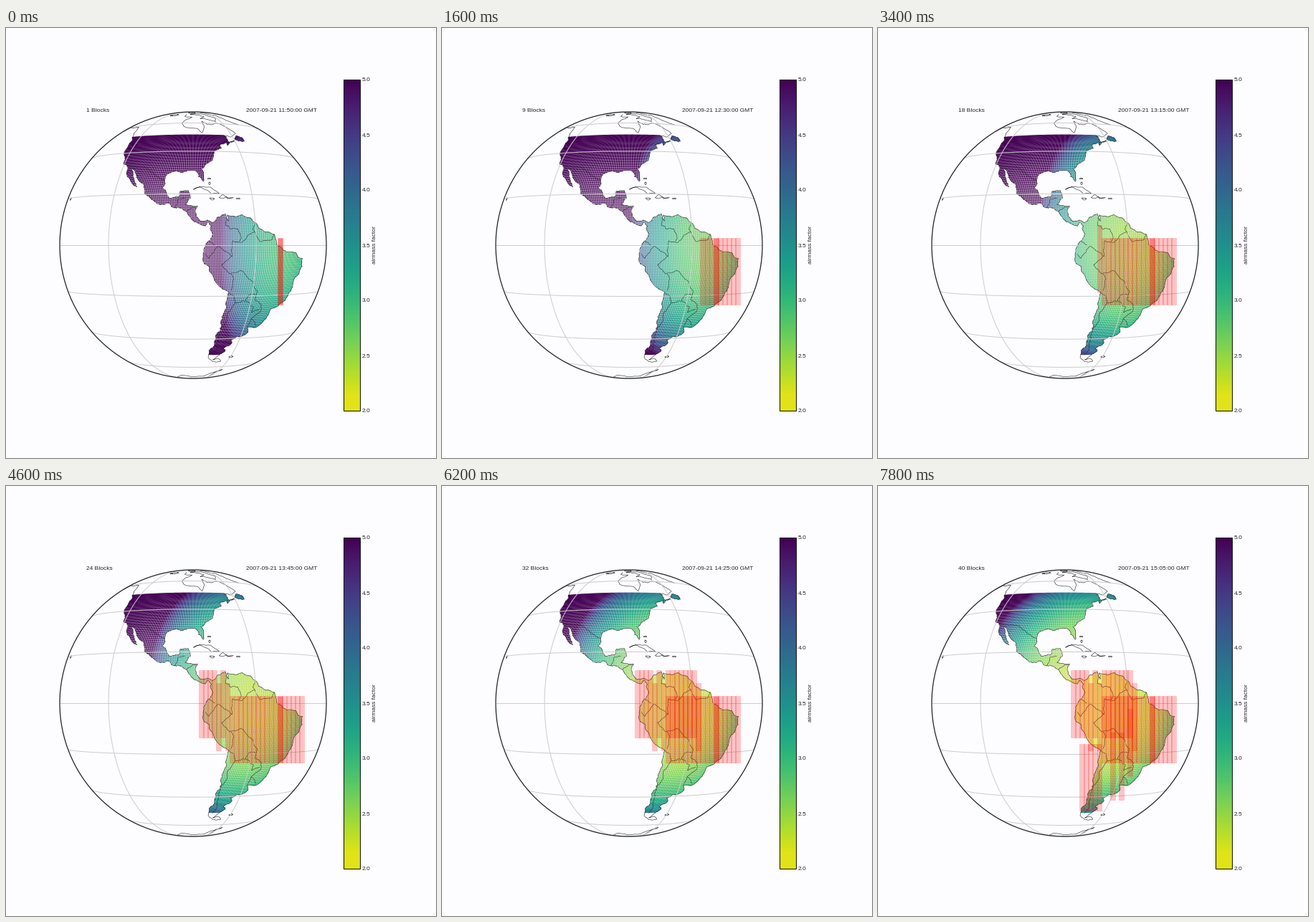
Write a matplotlib script that moves like this. It is 600 px wide and 600 px high and loops after 8000 ms.

```python
import numpy as np
import matplotlib.pyplot as plt
from matplotlib.animation import FuncAnimation
from matplotlib.collections import LineCollection
from matplotlib.colors import ListedColormap
from matplotlib.patches import Circle, Rectangle
from matplotlib.path import Path

SIZE, FRAMES, STEP = 600, 40, 200
CX, CY, R = 261, 303, 186        # globe on the stage
LON0, DIST = -85, 8.0            # view centre and eye distance
SAT = 6.61                       # satellite orbit in earth radii
BG = "#fdfcfe"
PITCH, BLOCK_W, BLOCK_H = 6.1, 6.8, 93.5

plt.rcParams["font.family"] = "Liberation Sans"
plt.rcParams["font.size"] = 6

# Coasts as (lon, lat); finer detail is added by rough()
NA_WEST = [
    (-127, 50), (-124.5, 48), (-124.3, 40.4), (-120.6, 34.6), (-117.2, 32.5),
    (-114.5, 27.5), (-112.1, 24.6), (-109.5, 23.2), (-112.8, 28.2), (-114.8, 31.7),
    (-113, 31), (-109.4, 26.2), (-105.4, 21.7), (-105.5, 20.4), (-102, 17.9),
    (-96.5, 15.7), (-94.5, 16.2), (-92.2, 14.5), (-87.7, 13), (-85.7, 10),
    (-83, 8.3), (-80.3, 7.3), (-79.5, 8.8), (-77.9, 7.2)]
NA_EAST = [
    (-77.4, 8.6), (-79.5, 9.5), (-82.3, 9.2), (-83.7, 11), (-83.2, 15),
    (-88.2, 15.7), (-86.9, 21.4), (-90.3, 21.1), (-91, 18.8), (-94.5, 18.2),
    (-97.8, 22.5), (-97.2, 27.7), (-94, 29.6), (-89.5, 29.3), (-86, 30.3),
    (-83.7, 30), (-82.5, 27.5), (-80.7, 25.2), (-81.3, 31), (-75.6, 35.3),
    (-74, 40.3), (-70, 41.8), (-70.1, 43.8), (-65, 45.4), (-65.8, 43.6),
    (-60, 46.5), (-64.5, 46), (-64.5, 49), (-65.5, 50)]
SA_WEST = [
    (-77.9, 7.2), (-77.3, 4), (-80, .5), (-80.9, -2.2), (-81.3, -5),
    (-77.1, -12), (-76, -14.3), (-70.4, -18.4), (-70.6, -25), (-71.6, -33),
    (-73.5, -38), (-73.3, -44), (-75.5, -47), (-75.4, -50)]
SA_EAST = [
    (-68.4, -50), (-65.8, -47.6), (-67.5, -46), (-63.7, -42.6), (-65, -41),
    (-62.2, -39), (-57.7, -38.1), (-56.9, -36.4), (-58.4, -34.3), (-54, -34.6),
    (-48.7, -28.3), (-48.4, -26), (-41.5, -22.6), (-39, -17), (-39, -13.5),
    (-35, -8.5), (-35.4, -5.2), (-40, -2.9), (-44.4, -2.6), (-50.3, 0),
    (-51.5, 4.2), (-57, 5.9), (-62, 10.5), (-71.4, 11.4), (-71.3, 9.2),
    (-72.2, 12), (-75.6, 10.6), (-77.4, 8.6)]
NEWFOUNDLAND = [(-57, 50), (-59.3, 47.7), (-53.6, 46.7), (-53, 48.6), (-55.8, 50)]

CUBA = [(-84.9, 21.9), (-82, 23.1), (-74.2, 20.2), (-77.6, 19.9), (-78.5, 21.2),
        (-84.9, 21.9)]
HISPANIOLA = [(-74.4, 18.5), (-72.8, 19.9), (-68.4, 18.6), (-74.4, 18.5)]
FUEGO = [(-75.4, -50), (-74, -53), (-68, -55.5), (-65.2, -54.7), (-68.4, -52.5),
         (-71.5, -53.5), (-68.4, -50)]
ANTARCTICA = [(-110, -74), (-80, -73.3), (-73, -73), (-67, -68.5), (-57, -63.4),
              (-62, -67), (-61, -74)]
PACIFIC_NORTH = [(-127, 50), (-131, 56), (-138, 59), (-151, 60), (-157, 57)]
HUDSON = [(-94, 72), (-94, 68), (-86, 67), (-94, 60), (-92, 57), (-82, 55), (-79, 51.5),
          (-77, 56), (-77.5, 62), (-69, 59), (-64, 60), (-56, 52), (-65.5, 50)]
BAFFIN = [(-65, 62), (-78, 65), (-73, 68), (-89, 72), (-78, 73.5), (-62, 67), (-65, 62)]
GREENLAND = [(-44, 60), (-52, 64), (-54, 72), (-71, 77.5), (-66, 80)]
# Small islands: lon, lat, half width, half height
ISLETS = [(-77.3, 18.1, 1, .3), (-66.4, 18.2, .8, .25), (-78, 26.6, .7, .3),
          (-78, 24.5, .4, .6), (-155.5, 19.6, .5, .6), (-59.5, -51.8, 1.5, .4),
          (-110, 71.5, 6, 1.5), (-87, 76, 6, 1.5)]

BRAZIL = [
    (-51.6, 4.2), (-52.5, 2.3), (-58.5, 1.5), (-60.5, 5.2), (-64, 3), (-66, 1),
    (-69.8, 1.7), (-69.9, -4.2), (-74, -7.5), (-70.6, -11), (-65.4, -10),
    (-60.2, -15), (-57.9, -18), (-57.9, -22), (-54.3, -24), (-53.7, -27),
    (-57.6, -30.2), (-53.4, -33.7)]
ANDES = [(-70.4, -18.4), (-68, -20), (-67, -23), (-70, -32), (-71.8, -42), (-73, -50)]
PARAGUAY = [(-67, -22.9), (-62.5, -22.2), (-61.7, -19.7), (-58, -20)]
PARANA = [(-62.5, -22.2), (-58, -25), (-58.4, -27.3), (-54.6, -26)]
URUGUAY = [(-57.6, -30.2), (-58.3, -33.5)]
TITICACA = [(-69.5, -17.7), (-69, -12.5), (-70, -11)]
MARANON = [(-80.3, -3.4), (-79, -5), (-75.3, -.2), (-78.8, 1.4)]
PUTUMAYO = [(-75.3, -.2), (-73, -2.3), (-69.9, -4.2)]
ORINOCO = [(-71.4, 11.8), (-72.5, 7.5), (-67.5, 6.2), (-67, 1.5)]
GUIANAS = [(-60, 8.4), (-61.2, 6), (-60.5, 5.2)]
RIO_GRANDE = [(-117.1, 32.5), (-106.5, 31.6), (-103, 29.2), (-97.2, 25.9)]
YUCATAN = [(-92.2, 14.5), (-91, 17.8), (-88.3, 18.2)]
MOSQUITO = [(-87.5, 13), (-86, 14), (-83.2, 15)]

# Columns counted from the east, with their top edge, in order of appearance
RUNS = [
    (range(5, -1, -1), 292.5), (range(6, 17), 292.5), ([17], 275),
    ([18], 257), ([19], 275), (range(20, 24), 257), ([9], 275),
    (range(10, 17), 257), ([10], 311), ([12, 14], 344), (range(17, 22), 359.5)]


def project(lon, lat):
    lam, phi = np.radians(np.asarray(lon) - LON0), np.radians(lat)
    depth = np.cos(phi) * np.cos(lam)
    k = R * np.sqrt(DIST**2 - 1) / (DIST - depth)
    x = CX + k * np.cos(phi) * np.sin(lam)
    y = CY - k * np.sin(phi)
    hidden = depth < 1 / DIST
    return np.where(hidden, np.nan, x), np.where(hidden, np.nan, y)


def rough(points, amount=.09):
    """Midpoint displacement, so that few points give a natural coast."""
    p = np.array(points, float)
    for _ in range(3):
        d = np.diff(p, axis=0)
        shift = rng.normal(0, amount, (len(d), 1)) * d[:, ::-1] * [-1, 1]
        out = np.empty((2 * len(p) - 1, 2))
        out[::2], out[1::2] = p, (p[1:] + p[:-1]) / 2 + shift
        p = out
    return p


def islet(lon, lat, w, h):
    a = np.linspace(0, 2 * np.pi, 7)
    return rough(np.column_stack([lon + w * np.cos(a), lat + h * np.sin(a)]), .15)


def add_lines(paths, color, width, z):
    segments = [np.column_stack(project(*np.transpose(p))) for p in paths]
    ax.add_collection(LineCollection(segments, colors=color, linewidths=width, zorder=z))


def land_grid(shapes, step=.5):
    lon, lat = np.meshgrid(np.arange(-130, -34, step), np.arange(-50, 50.1, step))
    pts = np.column_stack([lon.ravel(), lat.ravel()])
    inside = np.zeros(len(pts), bool)
    for shape in shapes:
        inside |= Path(shape).contains_points(pts)
    # the northern edge row runs along the border of the mainland
    inside |= (pts[:, 1] == 50) & (pts[:, 0] > -127) & (pts[:, 0] < -65.5)
    return pts[inside].T


def cos_angle(lon, lat, lon_c, lat_c):
    a, b = np.radians(lat), np.radians(lat_c)
    return np.sin(a) * np.sin(b) + np.cos(a) * np.cos(b) * np.cos(np.radians(lon - lon_c))


def airmass(i):
    sun = cos_angle(grid_lon, grid_lat, .75 - 1.25 * i, .6)
    c = cos_angle(grid_lon, grid_lat, LON0, 0)
    view = (SAT * c - 1) / np.sqrt(SAT**2 + 1 - 2 * SAT * c)
    return 1 / np.maximum(sun, .05) + 1 / np.maximum(view, .05)


rng = np.random.default_rng(4)
na_west, na_east, sa_west, sa_east, newfoundland = [
    rough(c) for c in (NA_WEST, NA_EAST, SA_WEST, SA_EAST, NEWFOUNDLAND)]
grid_lon, grid_lat = land_grid([np.vstack([na_west, na_east]),
                                np.vstack([sa_west, sa_east]), newfoundland])
cmap = ListedColormap(plt.get_cmap("viridis")(np.minimum(np.linspace(1, 0, 256), .955)))

fig = plt.figure(figsize=(6, 6), dpi=100, facecolor=BG)
ax = fig.add_axes([0, 0, 1, 1])
ax.axis("off")

gx, gy = project(grid_lon, grid_lat)
dots = ax.scatter(gx, gy, c=airmass(0), s=1.25, lw=0, cmap=cmap, vmin=2, vmax=5, zorder=2)

coasts = [na_west, na_east, sa_west, sa_east, newfoundland]
coasts += [rough(c) for c in (CUBA, HISPANIOLA, FUEGO, ANTARCTICA, PACIFIC_NORTH,
                              HUDSON, BAFFIN, GREENLAND)]
coasts += [islet(*i) for i in ISLETS]
add_lines(coasts, "#222222", .4, 3)
add_lines([rough(b) for b in (BRAZIL, ANDES, PARAGUAY, PARANA, URUGUAY, TITICACA, MARANON,
                              PUTUMAYO, ORINOCO, GUIANAS, RIO_GRANDE, YUCATAN, MOSQUITO)],
          "#222222", .35, 3)

sweep = np.linspace(-180, 180, 721)
grid = [(sweep, np.full(721, p)) for p in range(-80, 81, 20)]
grid += [(np.full(721, m), sweep * 80 / 180) for m in (-120, -60)]
add_lines([np.column_stack(g) for g in grid], "#cccccc", .7, 4)
ax.add_patch(Circle((CX, CY), R, fill=False, ec="#1c2424", lw=.9, zorder=5))

blocks = []
for columns, top in RUNS:
    for s in columns:
        alpha = .22 if blocks else .5
        box = Rectangle((416 - PITCH * s - BLOCK_W, top), BLOCK_W, BLOCK_H,
                        fc=(1, 0, 0, alpha), ec=(1, 0, 0, .22), lw=.4, zorder=6)
        blocks.append(ax.add_patch(box))

# Colour bar
ax.imshow(np.linspace(5, 2, 256)[:, None], cmap=cmap, vmin=2, vmax=5, aspect="auto",
          extent=(471, 493.5, 534, 72), zorder=2)
ax.add_patch(Rectangle((471, 72), 22.5, 462, fill=False, ec="#1c1c1c", lw=.8, zorder=3))
for v in np.arange(2, 5.1, .5):
    ax.text(497, 534 - (v - 2) * 154, f"{v:.1f}", va="center_baseline", color="#262626")
ax.text(514, 303, "airmass factor", rotation=90, ha="center", va="center", color="#262626")

count = ax.text(112.5, 117, "", color="#262626")
clock = ax.text(335, 117, "", color="#262626")
ax.set(xlim=(0, SIZE), ylim=(SIZE, 0))


def draw(i):
    dots.set_array(airmass(i))
    for j, box in enumerate(blocks):
        box.set_visible(j <= i)
    hour, minute = divmod(11 * 60 + 50 + 5 * i, 60)
    count.set_text(f"{i + 1} Blocks")
    clock.set_text(f"2007-09-21 {hour:02d}:{minute:02d}:00 GMT")
    return [dots, count, clock, *blocks]


anim = FuncAnimation(fig, draw, frames=FRAMES, interval=STEP, repeat=True, repeat_delay=0)
plt.show()
```
